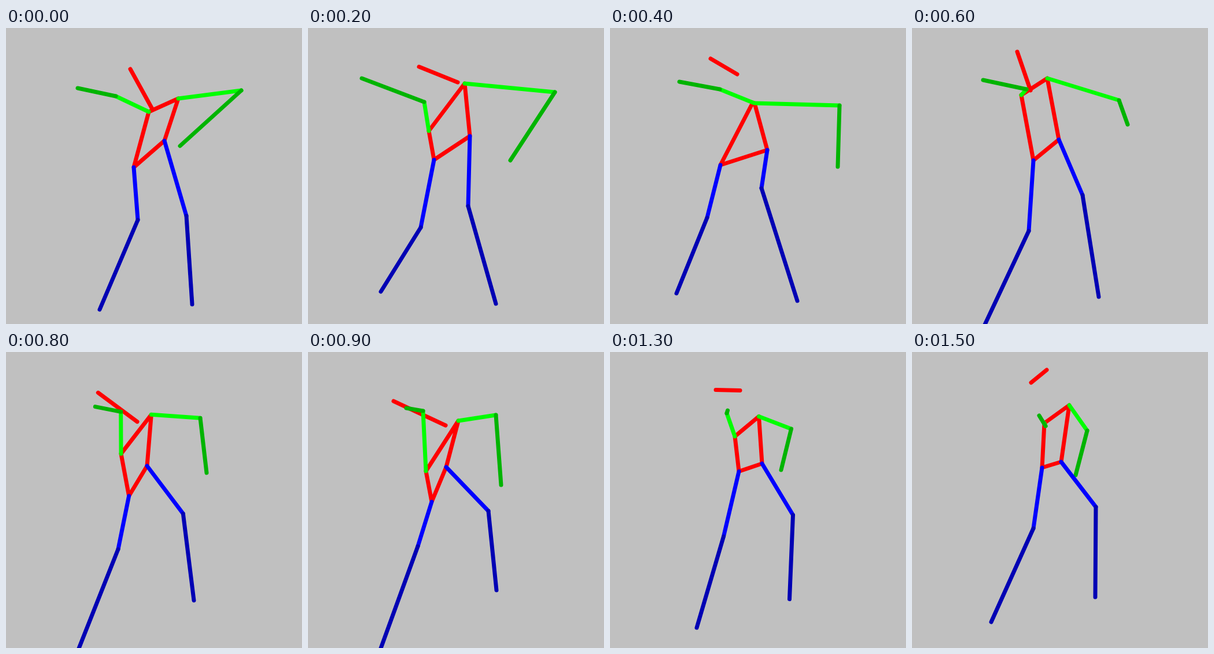
An HTML page with a canvas for the animation above (1.6 s loop, 512 px wide and 512 px high).

```html
<!DOCTYPE html>
<html lang="en">
<head>
<meta charset="utf-8">
<title>Walking stick figure</title>
<style>
  html, body { margin: 0; height: 100%; overflow: hidden; background: #c0c0c0; }
  canvas { display: block; width: 100vw; height: 100vh; }
</style>
</head>
<body>
<canvas id="stage" width="512" height="512"></canvas>
<script>
const ctx = document.getElementById('stage').getContext('2d');
const STEP = 100, STEPS = 16;
const keys = [0, 2, 4, 6, 9, 11, 15, STEPS];

// A joint travels through one point per key step, then back to its start.
const joint = (...points) => step => {
  const i = keys.findLastIndex(key => key <= step);
  const k = (step - keys[i]) / (keys[i + 1] - keys[i]);
  const from = points[i], to = points[(i + 1) % points.length];
  return from.map((v, axis) => v + (to[axis] - v) * k);
};

const head = joint([215, 71], [192, 67], [174, 53], [182, 41], [148, 85], [160, 78], [206, 53]);
const neck = joint([253, 140], [259, 94], [220, 80], [205, 108], [238, 127], [217, 102], [233, 31]);

const shoulderL = joint([247, 145], [209, 178], [247, 129], [189, 116], [204, 206], [203, 169], [229, 123]);
const elbowL = joint([190, 118], [201, 128], [190, 106], [198, 106], [199, 102], [173, 84], [231, 128]);
const wristL = joint([124, 104], [93, 87], [120, 93], [123, 90], [170, 97], [187, 92], [220, 110]);

const shoulderR = joint([298, 122], [271, 96], [250, 130], [234, 87], [260, 119], [243, 131], [272, 92]);
const elbowR = joint([407, 108], [427, 111], [397, 134], [358, 125], [325, 109], [324, 130], [303, 136]);
const wristR = joint([301, 204], [350, 229], [394, 240], [373, 167], [334, 230], [309, 195], [283, 213]);

const hipL = joint([221, 241], [218, 228], [191, 237], [210, 229], [214, 259], [221, 213], [225, 200]);
const kneeL = joint([228, 332], [195, 345], [168, 328], [202, 351], [190, 336], [183, 333], [210, 305]);
const ankleL = joint([162, 487], [126, 456], [115, 459], [126, 513], [125, 515], [163, 487], [137, 467]);

const hipR = joint([274, 195], [280, 187], [272, 211], [254, 193], [239, 199], [268, 196], [258, 190]);
const kneeR = joint([312, 325], [277, 308], [262, 277], [295, 289], [312, 275], [315, 296], [318, 268]);
const ankleR = joint([322, 478], [325, 477], [324, 472], [323, 465], [326, 412], [304, 431], [317, 424]);

const bones = [
  ['#f00', head, neck],
  ['#f00', shoulderL, shoulderR, hipR, hipL, shoulderL],
  ['#0f0', shoulderL, elbowL],
  ['#0f0', shoulderR, elbowR],
  ['#00b400', elbowL, wristL],
  ['#00b400', elbowR, wristR],
  ['#00f', hipL, kneeL],
  ['#00f', hipR, kneeR],
  ['#0000b4', kneeL, ankleL],
  ['#0000b4', kneeR, ankleR],
];

ctx.lineWidth = 7;
ctx.lineCap = ctx.lineJoin = 'round';

function draw(now) {
  const step = Math.floor(now / STEP) % STEPS;
  ctx.clearRect(0, 0, 512, 512);
  for (const [color, ...joints] of bones) {
    ctx.strokeStyle = color;
    ctx.beginPath();
    joints.forEach(at => ctx.lineTo(...at(step)));
    ctx.stroke();
  }
}

const start = performance.now();
function tick() {
  draw(performance.now() - start);
  requestAnimationFrame(tick);
}
tick();
</script>
</body>
</html>
```
